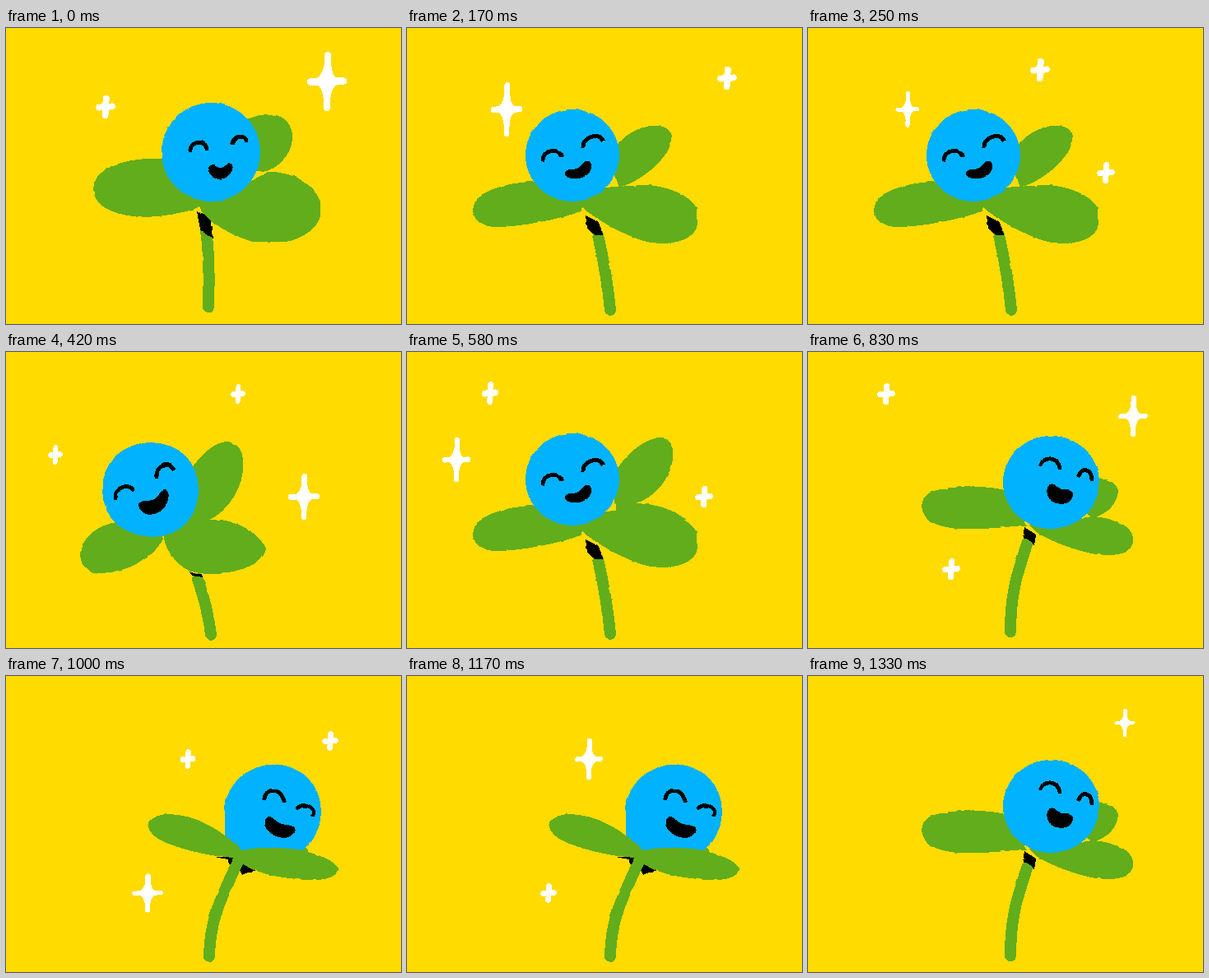
Animation of 480 by 360 pixels, one loop 1410 ms. Source, as an HTML page without scripts:

```html
<!DOCTYPE html>
<html lang="en">
<head>
<meta charset="utf-8">
<title>Dancing flower</title>
<style>
html, body { margin: 0; width: 100%; height: 100%; overflow: hidden; background: #ffdb00; }
svg { display: block; width: 100vw; height: 100vh; shape-rendering: crispEdges; }
.leaf { fill: #62ad1c; }
.stem { fill: none; stroke: #62ad1c; stroke-width: 14; stroke-linecap: round; }
.head { fill: #00b2ff; }
.eye { fill: none; stroke: #000; stroke-width: 5; stroke-linecap: round; }
.pose { filter: url(#rough); }
.star { fill: #fff; stroke: #fff; stroke-width: 8.5; stroke-linecap: round; stroke-linejoin: round; }
.plus { fill: none; stroke: #fff; stroke-width: 6.6; stroke-linecap: round; }

/* Each drawing is shown for 80 or 90 ms, starting at --t */
.show { visibility: hidden; animation: short 1410ms step-end calc(var(--t) * 1ms - 1410ms) infinite; }
.long { animation-name: long; }
@keyframes short { 0% { visibility: visible; } 5.674%, 100% { visibility: hidden; } }
@keyframes long { 0% { visibility: visible; } 6.383%, 100% { visibility: hidden; } }
</style>
</head>
<body>
<svg viewBox="0 0 480 360">
<defs>
  <filter id="rough" filterUnits="userSpaceOnUse" x="0" y="0" width="480" height="360" color-interpolation-filters="sRGB">
    <feTurbulence type="fractalNoise" baseFrequency=".07" numOctaves="2" seed="4"/>
    <feDisplacementMap in="SourceGraphic" scale="2.500" xChannelSelector="R" yChannelSelector="G"/>
  </filter>

  <path id="star" class="star" d="M1-32L0 32M-20 .5L20-.5M1-20Q2-4 11 0Q2 4 0 20Q-2 4-11 0Q-2-4 1-20Z"/>
  <path id="plus" class="plus" d="M.6-8.500L-.4 8.500M-6.500 .5L6.500-.5"/>

  <g id="upright" class="pose">
    <path class="leaf" d="M288 114C302 106 312 105 322 105C340 106 349 120 348 135C346 155 330 172 312 175L290 170Z"/>
    <path class="leaf" d="M200 160C150 155 106 168 106 196C106 220 140 230 170 230C195 229 215 225 232 219L240 200Z"/>
    <path class="leaf" d="M230 212L240 226C255 243 285 256 300 260H340C362 257 381 240 382 228V210C374 188 345 174 318 175L300 185Z"/>
    <path class="stem" d="M243 246Q248 280 246 339"/>
    <path d="M232 223L240 226L250 236L252 256L236 246Z"/>
    <ellipse class="head" cx="249" cy="151" rx="60" ry="60"/>
    <path class="eye" d="M224 148C226 137 242 136 244 147M275 140C277 130 291 130 292 137"/>
    <path d="M245 170C247 165 252 165 255 168C260 172 266 169 269 165C274 162 277 168 275 173C272 180 266 184 259 184C251 183 245 176 245 170Z"/>
  </g>

  <path id="lowLeaf" class="leaf pose" d="M245 155C262 130 280 120 300 119C316 118 322 125 321 138C317 160 285 186 258 194Z"/>
  <path id="highLeaf" class="leaf pose" d="M250 150C265 125 285 108 305 104C320 103 325 115 323 130C320 155 300 178 278 184C300 184 322 190 340 204L255 200Z"/>
  <g id="left" class="pose">
    <path class="leaf" d="M160 187C125 186 80 198 80 221C80 236 95 243 112 242C145 241 185 232 212 223L215 200Z"/>
    <path class="leaf" d="M208 210L216 221C235 236 265 252 290 260C318 265 345 260 352 243V219C344 202 310 190 285 191L240 194Z"/>
    <path class="stem" d="M232 252Q243 300 247 343"/>
    <path d="M217 228L233 236L238 252L227 252L219 243Z"/>
    <ellipse class="head" cx="201" cy="155" rx="57" ry="56"/>
    <path class="eye" d="M165 160C166 148 184 146 187 155M214 144C215 131 234 128 238 136"/>
    <path d="M192 176C193 172 198 172 203 172C210 171 212 165 217 162C223 160 225 166 224 171C221 180 212 184 204 183C197 182 192 180 192 176Z"/>
  </g>

  <g id="farLeft" class="pose">
    <path class="leaf" d="M220 150C235 125 255 108 270 109C285 111 290 125 288 145C284 175 262 202 235 209L205 214Z"/>
    <path class="leaf" d="M135 207C110 210 90 228 90 247C91 263 103 270 118 269C150 267 180 250 191 227L180 205Z"/>
    <path class="stem" d="M233 276Q245 310 249 344"/>
    <path class="leaf" d="M191 220C192 238 204 256 222 266C245 274 280 270 301 258C312 251 316 243 316 239C310 225 290 208 262 204C245 203 225 207 205 214Z"/>
    <path d="M223 267Q230 271 238 270L239 274L226 272Z"/>
    <path class="head" d="M117 168C117 132 143 110 176 110C211 111 234 133 234 168C234 200 213 224 179 225C142 223 118 204 117 168Z"/>
    <path class="eye" d="M133 178C132 164 148 160 154 167M183 152C182 138 197 133 203 142"/>
    <path d="M161 186C161 181 167 181 174 181C182 180 185 173 190 169C197 165 199 172 197 179C194 192 185 198 174 198C167 197 161 192 161 186Z"/>
  </g>

  <g id="right" class="pose">
    <path class="leaf" d="M345 155C358 152 374 156 377 168C376 185 365 195 348 202L335 195Z"/>
    <path class="leaf" d="M240 168C210 161 165 163 148 171C135 179 136 193 145 203C158 215 185 216 212 215C235 214 255 211 266 211Z"/>
    <path class="leaf" d="M268 210L277 219C295 230 325 242 350 246C375 249 392 246 395 232C397 217 385 208 365 203C350 199 340 199 325 205Z"/>
    <path class="stem" d="M267 230C258 262 246 285 246 340"/>
    <path d="M263 213L277 222L275 236Q269 226 261 227Z"/>
    <ellipse class="head" cx="295.500" cy="158.500" rx="58.500" ry="56.500"/>
    <path class="eye" d="M282 137C287 127 303 127 306 141M329 150C333 140 345 142 345 155"/>
    <path d="M291 165C293 159 299 159 303 164C308 169 315 165 320 169C325 173 320 182 314 184C306 186 296 184 293 178C290 173 290 168 291 165Z"/>
  </g>

  <g id="farRight" class="pose">
    <circle class="leaf" cx="362" cy="213" r="5.500"/>
    <path class="head" d="M266 160C268 130 295 108 327 107C357 109 383 130 383 165C382 190 371 205 358 214H290L267 202Q265 180 266 160Z"/>
    <path d="M253 220H282L290 228L304 238L294 239L287 242L282 234L272 230L269 223Z"/>
    <path class="stem" d="M282 225C266 262 248 290 247 341"/>
    <path class="leaf" d="M288 213C270 195 245 177 220 171C200 166 180 167 173 178C170 188 180 197 195 203C220 213 248 219 268 220L290 224Z"/>
    <path class="leaf" d="M275 215C300 207 330 208 355 211C380 217 400 224 403 234C403 246 385 249 365 248C340 246 310 243 288 229Z"/>
    <path class="eye" d="M314 148C318 135 333 136 338 152M355 160C362 154 376 159 373 169"/>
    <path d="M314 177C316 170 322 169 327 175C333 182 342 180 349 183C354 189 347 197 337 197C325 196 313 187 314 177Z"/>
  </g>
</defs>

<rect width="480" height="360" fill="#ffdb00"/>

<g class="show" style="--t:0">
  <use href="#upright"/>
  <use href="#star" transform="translate(390 65)"/>
  <use href="#plus" transform="translate(121 96) scale(1.2)"/>
</g>
<g class="show long" style="--t:80">
  <use href="#upright"/>
  <use href="#star" transform="translate(390 63) scale(.7)"/>
  <use href="#star" transform="translate(121 98) scale(.66)"/>
</g>
<g class="show" style="--t:170">
  <use href="#lowLeaf"/><use href="#left"/>
  <use href="#star" transform="translate(121 99) scale(.8 .91)"/>
  <use href="#plus" transform="translate(389 61) scale(1.2)"/>
</g>
<g class="show" style="--t:250">
  <use href="#lowLeaf"/><use href="#left"/>
  <use href="#star" transform="translate(121 99) scale(.6)"/>
  <use href="#plus" transform="translate(282 51) scale(1.2)"/>
  <use href="#plus" transform="translate(362 176) scale(1.1)"/>
</g>
<g class="show long" style="--t:330">
  <use href="#farLeft"/>
  <use href="#plus" transform="translate(121 99) scale(1.1)"/>
  <use href="#star" transform="translate(282 51) scale(.72)"/>
  <use href="#star" transform="translate(362 176) scale(.6)"/>
</g>
<g class="show" style="--t:420">
  <use href="#farLeft"/>
  <use href="#plus" transform="translate(60 125) scale(.9 1)"/>
  <use href="#plus" transform="translate(282 51) scale(.9 1)"/>
  <use href="#star" transform="translate(362 176) scale(.8 .77)"/>
</g>
<g class="show" style="--t:500">
  <use href="#highLeaf"/><use href="#left"/>
  <use href="#star" transform="translate(60 128) scale(.55)"/>
  <use href="#star" transform="translate(361 176) scale(.6)"/>
</g>
<g class="show long" style="--t:580">
  <use href="#highLeaf"/><use href="#left"/>
  <use href="#star" transform="translate(60 131) scale(.72 .75)"/>
  <use href="#plus" transform="translate(101 50) scale(1 1.2)"/>
  <use href="#plus" transform="translate(361 176) scale(1.1)"/>
</g>
<g class="show" style="--t:670">
  <use href="#upright"/>
  <use href="#star" transform="translate(60 131) scale(.55)"/>
  <use href="#star" transform="translate(99 50) scale(.75)"/>
  <use href="#plus" transform="translate(396 78) scale(1.1)"/>
</g>
<g class="show" style="--t:750">
  <use href="#upright"/>
  <use href="#plus" transform="translate(60 131)"/>
  <use href="#star" transform="translate(97 50) scale(.6)"/>
  <use href="#star" transform="translate(396 78) scale(.55)"/>
</g>
<g class="show long" style="--t:830">
  <use href="#right"/>
  <use href="#plus" transform="translate(95 51) scale(1.1)"/>
  <use href="#star" transform="translate(395 78) scale(.74 .7)"/>
  <use href="#plus" transform="translate(174 264) scale(1.1)"/>
</g>
<g class="show" style="--t:920">
  <use href="#right"/>
  <use href="#star" transform="translate(395 79) scale(.55)"/>
  <use href="#star" transform="translate(173 264) scale(.5)"/>
</g>
<g class="show" style="--t:1000">
  <use href="#farRight"/>
  <use href="#plus" transform="translate(394 79)"/>
  <use href="#plus" transform="translate(221 101) scale(.95 1)"/>
  <use href="#star" transform="translate(172 264) scale(.77 .65)"/>
</g>
<g class="show long" style="--t:1080">
  <use href="#farRight"/>
  <use href="#star" transform="translate(221 101) scale(.55)"/>
  <use href="#star" transform="translate(172 264) scale(.5)"/>
</g>
<g class="show" style="--t:1170">
  <use href="#farRight"/>
  <use href="#star" transform="translate(221 101) scale(.7)"/>
  <use href="#plus" transform="translate(172 264)"/>
</g>
<g class="show" style="--t:1250">
  <use href="#right"/>
  <use href="#plus" transform="translate(221 101)"/>
  <use href="#plus" transform="translate(385 57)"/>
</g>
<g class="show" style="--t:1330">
  <use href="#right"/>
  <use href="#star" transform="translate(385 57) scale(.52 .48)"/>
</g>
</svg>
</body>
</html>
```
